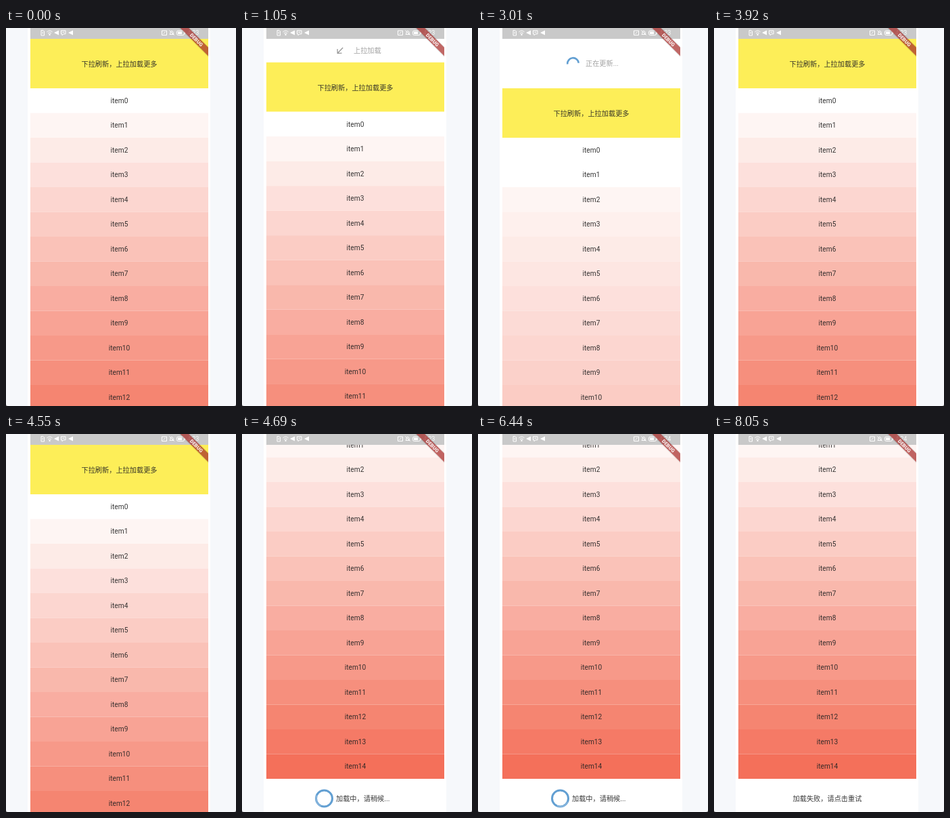
Recreate the animation shown at these times as an HTML page. Size 340 by 558 pixels, loop 8.19 s.

```html
<!DOCTYPE html>
<html lang="zh-CN">
<head>
<meta charset="utf-8">
<title>下拉刷新</title>
<style>
html, body { margin: 0; width: 100%; height: 100%; overflow: hidden; background: #f6f8fb; }
svg { display: block; width: 340px; height: 558px; }
text { font: 10.2px Roboto, "Noto Sans CJK SC", "Noto Sans CJK", sans-serif; fill: #222; fill-opacity: .9; }
.mid { text-anchor: middle; }
.dim { fill: #999; }
.line { fill: none; stroke: #fff; stroke-width: 1; }
.spin { fill: none; stroke: #629fd2; }
</style>
</head>
<body>
<svg viewBox="0 0 340 558">
  <defs>
    <clipPath id="screen"><path d="M36 16h263v542H36z"/></clipPath>
    <clipPath id="phone"><path d="M36 0h263v558H36z"/></clipPath>
  </defs>
  <path fill="#f6f8fb" d="M0 0h340v558H0z"/>
  <path fill="#fff" d="M32 0h270v558H32z"/>
  <path fill="#777" d="M0 555q0 3 3 3H0zM340 555q0 3-3 3h3z"/>

  <g clip-path="url(#screen)">
    <g id="head">
      <g id="pull">
        <path id="arrow" fill="none" stroke="#999" stroke-width="1.3" d="M0-6V5.5M-4.5 1 0 5.5 4.5 1"/>
        <text class="dim" x="165" y="3.7">上拉加载</text>
      </g>
      <g id="busy">
        <path id="arc" class="spin" stroke-width="2.7" d="M-8.3 0A8.3 8.3 0 0 1 8.3 0"/>
        <text class="dim" x="159" y="3.7">正在更新...</text>
      </g>
    </g>
    <g id="list">
      <path fill="#fdee58" d="M36 16h263v73H36z"/>
      <text class="mid" x="167.5" y="57">下拉刷新，上拉加载更多</text>
      <g id="rows"></g>
      <path fill="#fff" d="M36 636.5h263v50H36z"/>
      <g id="loading">
        <circle class="spin" cx="121.5" cy="665.5" r="12" stroke-width="3"/>
        <path id="glint" fill="none" stroke="#8db9df" stroke-width="1.5" d="M-8.5-8.5A12 12 0 0 1 8.5-8.5"/>
        <text x="139" y="669.5">加载中，请稍候...</text>
      </g>
      <text id="failed" class="mid" x="167.5" y="669.5">加载失败，请点击重试</text>
    </g>
  </g>

  <g clip-path="url(#phone)">
    <path fill="#c9c9c9" d="M36 0h263v16H36z"/>
    <path class="line" d="M52 3.5h3l1.5 1.5v6H52zM54.2 5.5v3M60.5 5.8q4-3.6 8 0M62 7.8q2.5-2 5 0"/>
    <circle cx="64.5" cy="9.8" r="1.2" fill="#fff"/>
    <path fill="#fff" d="M71 7l7-3.5v7zM92 7l7-3.5v7z"/>
    <path class="line" d="M81.5 3.8h6.5v5h-3l-2 2v-2h-1.5zM83.3 6.2h3"/>
    <path class="line" d="M230.5 4h7v6.500h-7zM232.5 8.500l3-2.500M242 9.500h6l-1-1.500V6q-2-3.500-4 0v2zM241.500 3.500l7 7"/>
    <rect x="252.500" y="4" width="11" height="6.500" rx="2" class="line"/>
    <path fill="#fff" d="M254 5.500h6v3.500h-6zM264 6h1.500v2.500H264z"/>
    <text id="clock" x="268" y="10.300" style="font-size:9px;fill:#fff"></text>
    <g transform="translate(299 0) rotate(45)">
      <path fill="#000" fill-opacity=".12" d="M-32 19.500h64v10.800h-64z"/>
      <path fill="#b02a26" fill-opacity=".66" d="M-32 20.400h64v8.800h-64z"/>
      <text class="mid" y="27.400" style="font-size:7.400px;font-weight:900;fill:#fff">DEBUG</text>
    </g>
  </g>
</svg>
<script>
const LOOP = 8190, STEP = 70, ROW = 36.5, HEAD = 73, COUNT = 15, END = 127.5;
const $ = id => document.getElementById(id);
const clamp = x => Math.min(1, Math.max(0, x));
const part = (t, from, to) => clamp((t - from) / (to - from));
const smooth = p => p * p * (3 - 2 * p);
const easeOut = p => 1 - (1 - p) ** 3;
const show = (id, on) => $(id).setAttribute('display', on ? 'inline' : 'none');
const move = (id, value) => $(id).setAttribute('transform', value);

let markup = '';
for (let i = 0; i < COUNT; i++) {
  const y = 89 + i * ROW;
  markup += `<rect x="36" y="${y}" width="263" height="${ROW}"/>` +
    `<text class="mid" x="167.5" y="${y + 21.9}">item${i}</text>`;
}
$('rows').innerHTML = markup;
const rects = [...$('rows').querySelectorAll('rect')];

// Header height: drag, settle on the refresh height, collapse.
function pullAt(t) {
  if (t < 1470) return 88 * smooth(part(t, 840, 1330));
  if (t < 3430) return 88 - (88 - HEAD) * easeOut(part(t, 1470, 1610));
  return HEAD * (1 - easeOut(part(t, 3360, 3780)));
}

function tint(i, long) {
  const k = long ? (i < 2 ? 0 : i / 2) : i;
  return `rgb(${255 - .8 * k},${255 - 10.2 * k},${255 - 11.8 * k})`;
}

function draw(t) {
  const pull = pullAt(t);
  const scroll = END * smooth(part(t, 4550, 4690));
  const refreshing = t >= 1470;
  const long = t >= 1750 && t < 3430;

  move('list', `translate(0 ${pull - scroll})`);
  move('head', `translate(0 ${16 + pull / 2})`);
  show('head', pull > 0);
  show('pull', !refreshing);
  show('busy', refreshing);
  move('arrow', `translate(145 0) rotate(${180 * clamp((pull - 22) / 52)})`);
  move('arc', `translate(140.5 0) rotate(${(t - 3010) * .36 - 6})`);

  rects.forEach((r, i) => r.setAttribute('fill', tint(i, long)));
  show('loading', t < 7000);
  show('failed', t >= 7000);
  move('glint', `translate(121.5 665.5) rotate(${t * .36})`);
  $('clock').textContent = t < 5600 ? '4:23' : '4:24';
}

const start = performance.now();
function tick() {
  const t = (performance.now() - start) % LOOP;
  draw(Math.floor(t / STEP) * STEP);
  requestAnimationFrame(tick);
}
tick();
</script>
</body>
</html>
```
